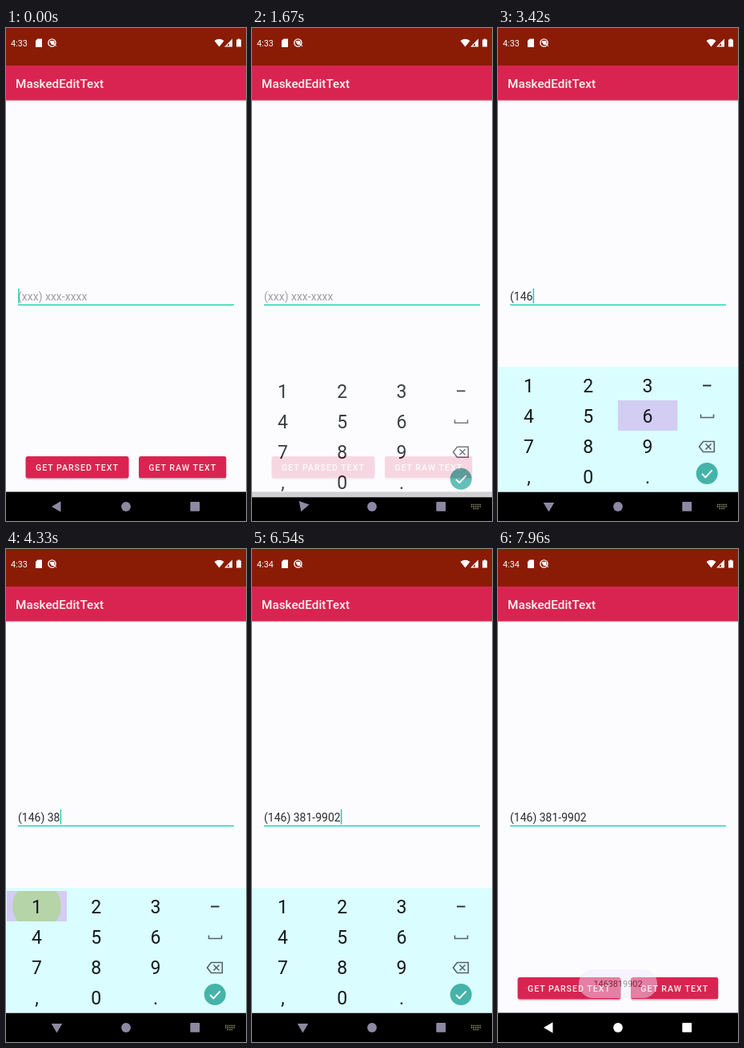
Recreate the animation shown at these times as an HTML page. Size 300 px wide and 617 px high, loop 8 s.

```html
<!DOCTYPE html>
<html lang="en">
<head>
<meta charset="utf-8">
<title>MaskedEditText</title>
<style>
html, body { margin: 0; width: 100%; height: 100%; overflow: hidden; background: #fcfcff; }
#stage { display: block; width: 100%; height: 100%; }
text { font-family: Roboto, sans-serif; white-space: pre; }
.title { font-size: 15.3px; font-weight: 500; fill: #fff4f0; }
.field { font-size: 14px; fill: #2b2b30; }
.button { font-size: 10.7px; font-weight: 500; letter-spacing: .95px; fill: #fff4ea; }
.key { font-size: 23px; fill: #14191c; text-anchor: middle; }
.line { fill: none; stroke: #59606e; stroke-width: 1.6; }
</style>
</head>
<body>
<svg id="stage" viewBox="0 0 300 617">
  <rect width="300" height="617" fill="#fcfcff"/>
  <rect y="90" width="300" height="1.5" fill="#e6dcdc"/>
  <rect width="300" height="47.5" fill="#8a1c06"/>
  <rect y="47" width="300" height="43.5" fill="#d92452"/>

  <text id="clock" x="6" y="23" font-size="10.8" fill="#fff"></text>
  <g fill="#fff">
    <path d="M39.5 13.5H45V24H37V16Z"/>
    <circle cx="57.5" cy="18.5" r="4.6" fill="none" stroke="#fff" stroke-width="1.4"/>
    <path d="M55 16.5H60V20.5H57ZM59 19L63 23" stroke="#fff"/>
    <path d="M260.5 16Q266.5 11.500 272.500 16L266.500 23.500Z"/>
    <path d="M274.500 22.800H282.300V15Z" fill="none" stroke="#fff" stroke-width="1.200"/>
    <path d="M279 18.500L282.500 15V23H279Z"/>
    <path d="M288 14.500H289.800V13.500H292.200V14.500H294V23.500H288Z"/>
  </g>
  <text class="title" x="12" y="75">MaskedEditText</text>

  <text id="hint" class="field" x="15" y="340.500" style="fill:#a09ca4">(xxx) xxx-xxxx</text>
  <text id="entry" class="field" x="15" y="340.500"></text>
  <rect id="cursor" y="326" width="1.500" height="18.500" fill="#1fcfae"/>
  <rect x="15" y="345.800" width="270" height="1.500" fill="#1fd3b2"/>

  <g fill="#000" opacity=".14">
    <rect x="25" y="538" width="128.500" height="27.500" rx="3"/>
    <rect x="166" y="538" width="109.500" height="27.500" rx="3"/>
  </g>
  <rect x="24.500" y="536" width="129" height="27.500" rx="3" fill="#d92452"/>
  <svg x="166" y="536" width="109.500" height="27.500">
    <rect width="109.500" height="27.500" rx="3" fill="#d92452"/>
    <circle id="tap" cx="55" cy="14" fill="#fff"/>
  </svg>
  <text class="button" x="37" y="554">GET PARSED TEXT</text>
  <text class="button" x="178.300" y="554">GET RAW TEXT</text>

  <g id="toast">
    <rect x="101" y="526" width="98" height="36" rx="18" fill="#f0eaff"/>
    <text id="message" x="150" y="548" font-size="10.900" text-anchor="middle" fill="#222"></text>
  </g>

  <rect y="580.500" width="300" height="36.500" fill="#000"/>
  <ellipse id="backTap" cx="63" cy="599" rx="38" ry="26" fill="#201f0c" clip-path="inset(8px 0 8px 0)"/>

  <g id="keyboard">
    <rect id="board" y="424" width="300" height="156.500"/>
    <svg id="cell" width="75" height="38">
      <rect width="75" height="38" fill="#d3ccf3"/>
      <circle id="ripple" cx="37.500" cy="19" fill="#b5d4a8"/>
    </svg>
    <g id="keys"></g>
    <path class="line" d="M256 447.500H266.500" style="stroke:#253035;stroke-width:1.900"/>
    <path class="line" d="M253.500 483.500V487.500H269.500V483.500"/>
    <path class="line" d="M251.500 524L256.500 517.500H270.300V530.500H256.500ZM259.500 520.500L266.500 527.500M266.500 520.500L259.500 527.500"/>
    <circle cx="261.200" cy="557.500" r="13.500" fill="#45b3a9"/>
    <path d="M255 558L259.300 562.300L267.700 553.300" fill="none" stroke="#fff" stroke-width="1.900"/>
  </g>

  <g id="nav">
    <path id="back" d="M57 599L68.500 592.200V605.800Z"/>
    <circle cx="150" cy="599" r="5.900"/>
    <rect x="230.300" y="593" width="11.800" height="11.800" rx="1"/>
  </g>
  <path id="switcher" d="M274 596.500H286M274 599H286M276.500 601.500H283.500" stroke="#a5a27e" stroke-width="1.400" stroke-dasharray="1.400 1.200"/>
</svg>
<script>
const $ = id => document.getElementById(id);
const set = (id, attrs) => {
  for (const k in attrs) $(id).setAttribute(k, attrs[k]);
};
const part = (t, from, to) => Math.min(1, Math.max(0, (t - from) / (to - from)));

const LOOP = 8000, COMMIT = 110, HOLD = 240;
const number = '1463819902';
const presses = [2290, 2830, 3220, 3580, 3930, 4280, 4800, 5180, 5640, 5940];
const layout = ['123', '456', '789', ',0.'];
const columns = [38.5, 112.7, 187];

layout.forEach((row, r) => [...row].forEach((label, c) => {
  const key = document.createElementNS('http://www.w3.org/2000/svg', 'text');
  key.textContent = label;
  key.setAttribute('class', 'key');
  key.setAttribute('x', columns[c]);
  key.setAttribute('y', 456 + 38 * r);
  $('keys').append(key);
}));
$('message').textContent = number;

function mask(digits) {
  if (!digits) return '';
  let out = '(' + digits.slice(0, 3);
  if (digits.length > 3) out += ') ' + digits.slice(3, 6);
  if (digits.length > 6) out += '-' + digits.slice(6);
  return out;
}

function drawField(t) {
  const typed = presses.filter(p => t >= p + COMMIT).length;
  $('entry').textContent = mask(number.slice(0, typed));
  const width = typed ? $('entry').getComputedTextLength() : 0;
  const blinkStart = typed ? presses[typed - 1] + COMMIT : 0;
  set('hint', { opacity: typed ? 0 : 1 });
  set('cursor', { x: 15.2 + width, opacity: (t - blinkStart) % 1000 < 500 ? 1 : 0 });
}

function drawKeyboard(t) {
  const enter = (1 - part(t, 1530, 1770)) ** 2;
  const leave = part(t, 6940, 7081) ** 2;
  const hidden = Math.max(t < 4000 ? enter : 0, leave);
  set('keyboard', { transform: `translate(0 ${40 * hidden})`, opacity: 1 - hidden });
  set('board', { fill: hidden ? '#fcfcff' : '#dafeff' });

  const i = presses.findIndex(p => t >= p && t < p + HOLD);
  set('cell', { visibility: i < 0 ? 'hidden' : 'visible' });
  if (i >= 0) {
    const r = layout.findIndex(row => row.includes(number[i]));
    const age = t - presses[i];
    set('cell', { x: 1 + 74.3 * layout[r].indexOf(number[i]), y: 428 + 38 * r });
    set('ripple', { r: 10 + 0.4 * age, opacity: age < COMMIT ? 1 : 0 });
  }
}

function drawNav(t) {
  const turn = part(t, 1530, 1710) - part(t, 6960, 7065);
  set('back', { transform: `rotate(${-90 * turn} 63.500 599)` });
  set('nav', { fill: t < 6900 ? '#8d89a3' : '#fff' });
  set('switcher', { opacity: t > 1560 && t < 6960 ? 1 : 0 });
  set('backTap', { opacity: part(t, 6860, 6940) * (1 - part(t, 7080, 7330)) });
}

function draw(t) {
  $('clock').textContent = t < 4900 ? '4:33' : '4:34';
  drawField(t);
  drawKeyboard(t);
  drawNav(t);
  set('tap', { r: 60 * part(t, 7590, 7760), opacity: 0.2 * part(t, 7590, 7640) * (1 - part(t, 7760, 7930)) });
  set('toast', { opacity: part(t, 7905, 8025) });
}

function frame(now) {
  draw(now % LOOP);
  requestAnimationFrame(frame);
}
draw(0);
requestAnimationFrame(frame);
</script>
</body>
</html>
```
